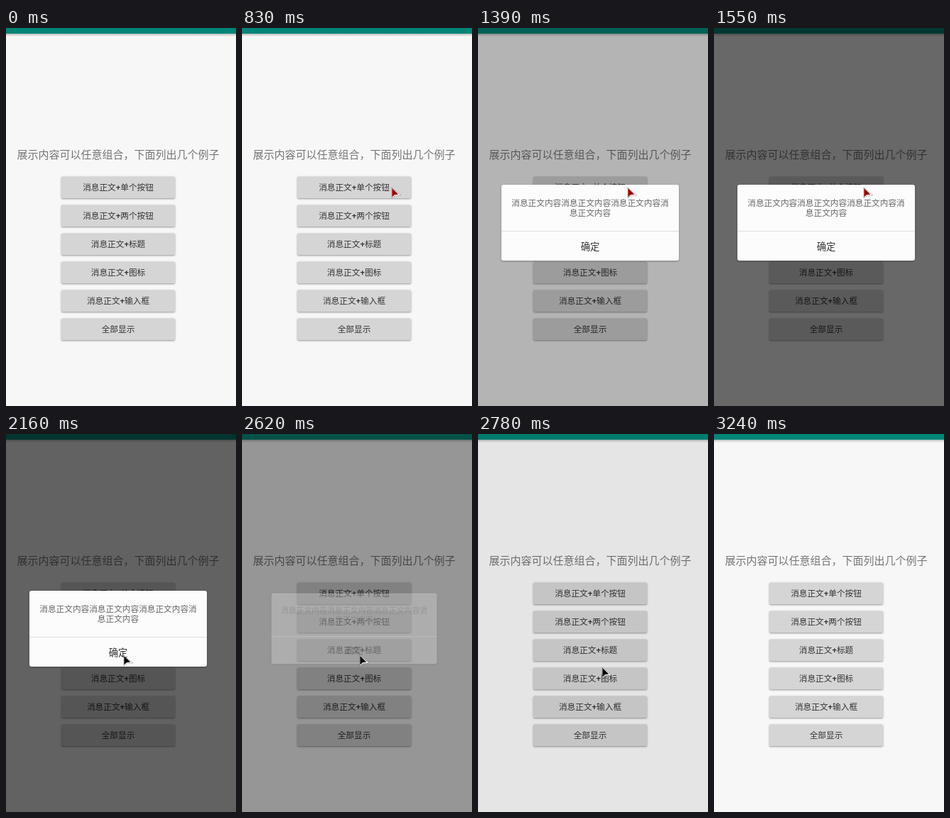
These frames come from a looping animation (324x533 px, 3.63 s). An HTML page with a canvas:

```html
<!DOCTYPE html>
<html lang="zh-CN">
<head>
<meta charset="utf-8">
<style>
  html, body { margin: 0; width: 100%; height: 100%; overflow: hidden; background: #f7f7f7; }
  canvas { display: block; }
</style>
</head>
<body>
<canvas id="stage" width="324" height="533"></canvas>
<script>
const ctx = document.getElementById('stage').getContext('2d');
const WIDTH = 324, HEIGHT = 533, LOOP = 3630, CENTER = 158;
const SMALL = 11.67;
const BUTTONS = ['消息正文+单个按钮', '消息正文+两个按钮', '消息正文+标题',
                 '消息正文+图标', '消息正文+输入框', '全部显示'];

const clamp = (v, max = 1) => Math.min(max, Math.max(0, v));
const ease = p => p * p * (3 - 2 * p);
const mix = (a, b, p) => a + (b - a) * p;
const moveTo = (a, b, p) => a.map((v, i) => mix(v, b[i], p));
const bezier = (a, b, c, d, p) => a.map((v, i) => {
  const r = 1 - p;
  return v * r ** 3 + 3 * b[i] * p * r * r + 3 * c[i] * p * p * r + d[i] * p ** 3;
});

// The screen refreshes in coarse steps while something moves.
const quantize = (t, start, step) => start + Math.floor((t - start) / step + 1e-6) * step;

function rect(x, y, w, h, color) {
  ctx.fillStyle = color;
  ctx.fillRect(x, y, w, h);
}

function panel(x, y, w, h, radius, color, shadow) {
  ctx.save();
  ctx.shadowColor = shadow;
  ctx.shadowBlur = 2.5;
  ctx.shadowOffsetY = 1;
  ctx.fillStyle = color;
  ctx.beginPath();
  ctx.roundRect(x, y, w, h, radius);
  ctx.fill();
  ctx.restore();
}

const setFont = (size, plus) => {
  ctx.font = plus ? `500 ${size}px Roboto, sans-serif`
                  : `${size}px "Noto Sans CJK SC", "Noto Sans CJK", sans-serif`;
};

// Centred line of text; a plus sign is set in the heavier Latin face.
function label(text, middle, size, color) {
  const runs = text.split(/(\+)/).map(run => {
    setFont(size, run === '+');
    return { run, width: ctx.measureText(run).width };
  });
  let x = CENTER - runs.reduce((sum, r) => sum + r.width, 0) / 2;
  ctx.fillStyle = color;
  for (const { run, width } of runs) {
    setFont(size, run === '+');
    ctx.fillText(run, x, middle + size * 0.38);
    x += width;
  }
}

function drawPage() {
  rect(0, 0, WIDTH, HEIGHT, '#f7f7f7');
  const shade = ctx.createLinearGradient(0, 8, 0, 12);
  shade.addColorStop(0, '#b8bcbb');
  shade.addColorStop(1, '#f7f7f7');
  rect(0, 8, WIDTH, 4, shade);
  rect(0, 0, WIDTH, 8, '#008577');
  label('展示内容可以任意组合，下面列出几个例子', 178, 15, '#757575');
  BUTTONS.forEach((text, i) => {
    const y = 209.5 + i * 40;
    panel(78, y, 160, 30.5, 1.7, '#d4d5d4', 'rgba(0,0,0,.4)');
    label(text, y + 15.5, SMALL, '#333');
  });
}

function drawDialog(alpha, scale) {
  if (alpha <= 0) return;
  ctx.save();
  ctx.globalAlpha = alpha;
  ctx.translate(CENTER, 274.5);
  ctx.scale(scale, scale);
  ctx.translate(-CENTER, -274.5);
  panel(33, 221, 250, 107, 3, '#fcfcfc', 'rgba(0,0,0,.3)');
  rect(33, 286, 250, 1, '#dedede');
  label('消息正文内容消息正文内容消息正文内容消', 247, SMALL, '#666');
  label('息正文内容', 260.5, SMALL, '#666');
  label('确定', 308, 13.33, '#333');
  ctx.restore();
}

function polygon(points) {
  ctx.beginPath();
  points.forEach(p => ctx.lineTo(...p));
  ctx.closePath();
}

function drawCursor([x, y], color) {
  ctx.save();
  ctx.translate(Math.round(x), Math.round(y));
  polygon([[0, 0], [0, 15], [4.5, 11.5], [13, 11]]);
  ctx.fillStyle = '#fff';
  ctx.fill();
  ctx.setLineDash([1, 1.4]);
  ctx.lineWidth = 0.7;
  ctx.strokeStyle = '#333';
  ctx.stroke();
  polygon([[0.4, 1], [0.4, 13.5], [3.8, 10.2], [9.3, 9.6]]);
  ctx.fillStyle = color;
  ctx.fill();
  ctx.restore();
}

const ENTRY = [280, 519], FIRST = [211, 225], OK = [166, 312], EXIT = [277, 523];

function cursorAt(t) {
  if (t < 290 || t >= 3240) return null;
  if (t < 1700) return moveTo(ENTRY, FIRST, ease(clamp((quantize(t, 290, 80) - 290) / 480)));
  if (t < 2700) {
    const p = clamp((quantize(t, 1700, 76.67) - 1623) / 537);
    return bezier(FIRST, [180, 193], [62, 300], OK, ease(p));
  }
  const now = t >= 3160 ? 3160 : quantize(t, 2700, 80);
  return moveTo(OK, EXIT, ease(clamp((now - 2700) / 460)));
}

function overlayAt(t) {
  if (t < 1160 || t >= 3160) return { dim: 0, alpha: 0, scale: 1 };
  if (t < 2620) {
    const now = quantize(t, 1160, 76.67);
    const p = 1 - (1 - clamp((now - 1245) / 150)) ** 2;
    return { dim: clamp((now - 1255) * 0.002, 0.6), alpha: p, scale: mix(0.9, 1, p) };
  }
  const now = quantize(t, 2620, 80);
  const p = clamp((now - 2518) / 150);
  return { dim: clamp(0.6 - (now - 2518) * 0.002, 0.6), alpha: 1 - p, scale: mix(1, 0.9, p) };
}

function render() {
  const t = performance.now() % LOOP;
  const { dim, alpha, scale } = overlayAt(t);
  const cursor = cursorAt(t);
  drawPage();
  rect(0, 0, WIDTH, HEIGHT, `rgba(0,0,0,${dim})`);
  drawDialog(alpha, scale);
  if (cursor) drawCursor(cursor, t >= 830 && t < 1620 ? '#a00000' : '#000');
  requestAnimationFrame(render);
}
render();
</script>
</body>
</html>
```
